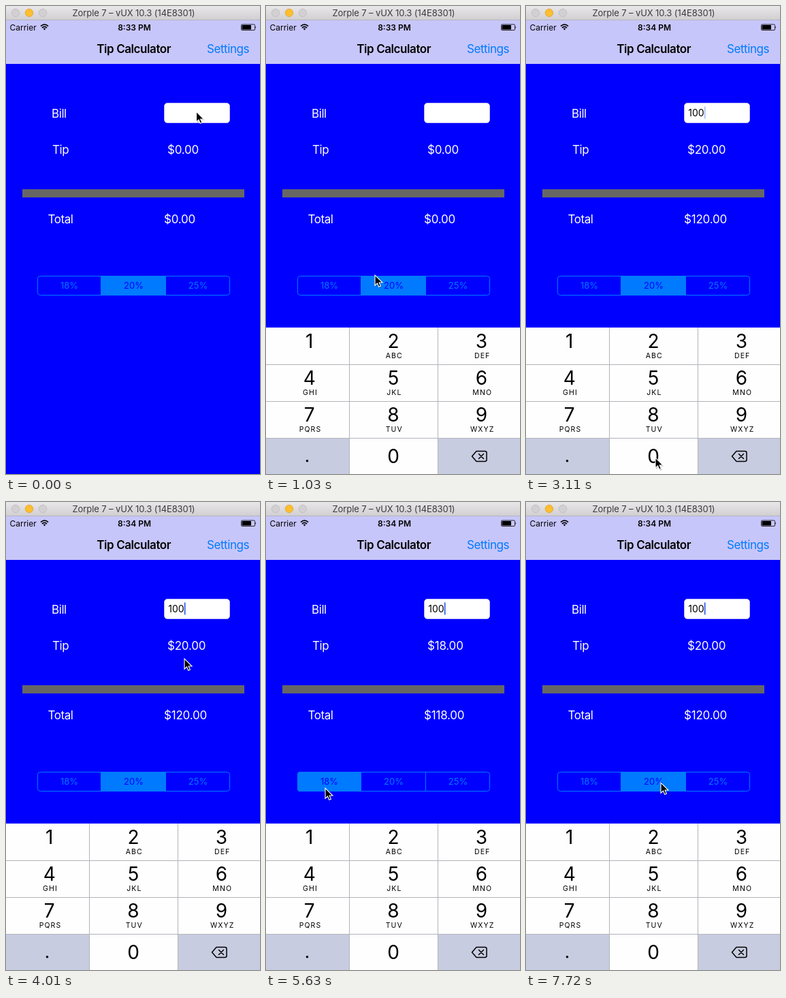
These frames come from a looping animation (373x687 px, 8000 ms). An HTML page:

```html
<!DOCTYPE html>
<html lang="en">
<head>
<meta charset="utf-8">
<title>Tip Calculator</title>
<style>
  html, body { margin: 0; width: 100%; height: 100%; overflow: hidden; background: #00f; }
  svg { display: block; width: 100vw; height: 100vh; cursor: default; }
  text { font-family: Inter, sans-serif; font-size: 17px; letter-spacing: -.43px; white-space: pre; }
  .mid { text-anchor: middle; }
  .label { fill: #fff; }
  .value { fill: #fff; letter-spacing: -.2px; }
  .bold { font-weight: 600; }
  .status { font-size: 12px; letter-spacing: 0; }
  .window { font-size: 13px; letter-spacing: -.1px; fill: #3c3b3c; }
  .entry { font-size: 14px; letter-spacing: 0; }
  .seg { font-size: 13px; letter-spacing: 0; }
  .digit { font-size: 28px; letter-spacing: 0; }
  .letters { font-size: 10.5px; letter-spacing: 1.1px; }
</style>
</head>
<body>
<svg viewBox="0 0 373 687" preserveAspectRatio="none">
  <defs>
    <linearGradient id="chrome" x2="0" y2="1">
      <stop stop-color="#e9e7e9"/><stop offset="1" stop-color="#d1cfd1"/>
    </linearGradient>
    <clipPath id="segClip"><rect x="46" y="396" width="283" height="29" rx="4"/></clipPath>
  </defs>

  <rect width="373" height="687" fill="#00f"/>
  <rect y="20" width="373" height="65" fill="#c7c6fa"/>
  <rect width="373" height="20" fill="url(#chrome)"/>
  <rect y="20" width="373" height="1" fill="#b5b3c0"/>
  <g fill="#d2d0d2" stroke="#bdbbbd" stroke-width=".8">
    <circle cx="14" cy="10" r="5.7"/>
    <circle cx="34" cy="10" r="5.7" fill="#fdbe2f" stroke="#e0a32b"/>
    <circle cx="54" cy="10" r="5.7"/>
  </g>
  <text class="window mid" x="187.5" y="15">Zorple 7 – vUX 10.3 (14E8301)</text>

  <text class="status" x="5.5" y="36">Carrier</text>
  <g fill="none" stroke="#000" stroke-width="1.7">
    <path d="M51 29.6Q56.5 24.6 62 29.6M53 32Q56.5 28.8 60 32"/>
    <path d="M54.6 33.3Q56.5 31.8 58.4 33.3L56.5 35.4Z" fill="#000" stroke="none"/>
  </g>
  <text id="clock" class="status bold mid" x="188.5" y="36"></text>
  <rect x="345.5" y="27" width="20" height="8.5" rx="1.5" fill="none" stroke="#000" stroke-width=".8"/>
  <rect x="346.5" y="28" width="13.5" height="6.5" rx=".5"/>
  <path d="M366.5 29.5q1.6 1.7 0 3.4z"/>

  <text class="bold mid" x="187.7" y="69">Tip Calculator</text>
  <text x="295" y="69" fill="#007aff">Settings</text>

  <text class="label" x="67" y="163.5">Bill</text>
  <text class="label" x="68" y="217">Tip</text>
  <text class="label" x="61.5" y="318.5">Total</text>
  <text id="tip" class="value" x="237" y="217"></text>
  <text id="total" class="value" x="232" y="318.5"></text>
  <rect x="24" y="269" width="326" height="12" fill="#666"/>

  <rect x="232.5" y="142.5" width="96" height="29" rx="4.5" fill="#fff" stroke="#dcdcf4" stroke-width=".6"/>
  <text id="bill" class="entry" x="238.3" y="162"></text>
  <rect id="caret" y="147.5" width="2" height="18" fill="#426bf2"/>

  <g id="segments">
    <rect id="selected" y="396" height="29" fill="#007aff" clip-path="url(#segClip)"/>
    <rect x="46.5" y="396.5" width="282" height="28" rx="4" fill="none" stroke="#007aff"/>
    <path d="M139.5 396v29M234.5 396v29" stroke="#007aff"/>
  </g>

  <g id="keyboard">
    <rect width="373" height="216" fill="#fefefe"/>
    <path d="M0 162h122v54H0zM253 162h120v54H253z" fill="#c8cce0"/>
    <rect id="pressed" height="54" fill="#c8cce0"/>
    <path d="M122.5 0v216M252.5 0v216M0 54.5h373M0 108.5h373M0 162.5h373" stroke="#b3b4ba" fill="none"/>
    <g id="keys"></g>
    <circle cx="60.5" cy="195.8" r="1.8"/>
    <g fill="none" stroke="#000" stroke-width="1.5" stroke-linejoin="round" stroke-linecap="round">
      <path d="M309 181.5h12.5q2.5 0 2.5 2.5v10q0 2.500-2.500 2.500H309L302.500 189Z"/>
      <path d="M312.500 185.500l7 7m0-7l-7 7"/>
    </g>
  </g>

  <g id="pointer">
    <path d="M1 1.500V17l3.600-3.300 2.300 5.300 2.900-1.200-2.300-5.200h5Z" fill="#000" opacity=".25"/>
    <path d="M0 0V15.200L3.500 12l2.300 5.300 2.600-1.100-2.300-5.200H11Z" fill="#000" stroke="#fff" stroke-width="1.1"/>
  </g>
</svg>

<script>
const $ = id => document.getElementById(id);
const LOOP = 8000, STEP = 148.3, SLACK = 16;

// Each row: first step, then the state held from there on.
const pointerSteps = [
  [0, 279.5, 155], [6, 238, 250], [7, 160, 395], [8, 92, 476], [9, 72, 496],
  [12, 130, 590], [13, 185, 650.5], [14, 190, 663],
  [23, 205, 600], [24, 228, 450], [25, 240, 330],
  [27, 262, 230], [28, 292, 140], [29, 316, 96], [30, 300, 150],
  [31, 252, 280], [32, 195, 385], [33, 171, 405.5], [34, 126, 411],
  [35, 97, 417], [36, 87, 420],
  [40, 98, 418], [41, 145, 411], [42, 215, 404], [43, 266, 400], [44, 276, 399.5],
  [48, 244, 406], [49, 198, 412]
];
const billSteps = [[0, ""], [11, "1"], [15, "10"], [17, "100"]];
const rateSteps = [[0, 1], [37, 0], [45, 2], [51, 1]];
const pressSteps = [[0, ""], [11, "1"], [12, ""], [17, "0"], [18, ""]];
const focusStep = 1, clockStep = 17, slideStart = 275;

const rates = [18, 20, 25];
const segEdges = [46, 139, 235, 329];
const segCenters = [93, 187.5, 282];
const keyCenters = [64, 187.3, 316.7];

const at = (table, step) => table.findLast(row => row[0] <= step);
const money = n => "$" + n.toFixed(2);

function addText(parent, cls, x, y, content) {
  const el = document.createElementNS("http://www.w3.org/2000/svg", "text");
  el.setAttribute("class", cls);
  el.setAttribute("x", x);
  el.setAttribute("y", y);
  el.textContent = content;
  parent.append(el);
  return el;
}

function setAttrs(el, attrs) {
  for (const name in attrs) el.setAttribute(name, attrs[name]);
}

const segLabels = rates.map((rate, i) =>
  addText($("segments"), "seg mid", segCenters[i], 415, rate + "%"));

["", "ABC", "DEF", "GHI", "JKL", "MNO", "PQRS", "TUV", "WXYZ"].forEach((letters, i) => {
  const x = keyCenters[i % 3], y = 54 * Math.floor(i / 3);
  addText($("keys"), "digit mid", x - .3, y + 30, i + 1);
  addText($("keys"), "letters mid", x + 1, y + 45, letters);
});
addText($("keys"), "digit mid", 187, 199, "0");

// Critically damped spring from 0 to 1.
function spring(ms) {
  const x = Math.max(0, ms) * .01826;
  return 1 - Math.exp(-x) * (1 + x);
}

function caretOpacity(step, resetStep) {
  const phase = (((step - resetStep) * STEP + 420) % 1000) / 1000;
  if (phase < .08) return .4;
  if (phase < .38) return 0;
  return phase < .5 ? .4 : 1;
}

function render(time) {
  const step = Math.floor((time + SLACK) / STEP);
  const [, x, y] = at(pointerSteps, step);
  const [typedStep, bill] = at(billSteps, step);
  const rate = at(rateSteps, step)[1];
  const key = at(pressSteps, step)[1];
  const tip = bill * rates[rate] / 100;

  $("clock").textContent = step < clockStep ? "8:33 PM" : "8:34 PM";
  $("bill").textContent = bill;
  $("tip").textContent = money(tip);
  $("total").textContent = money(+bill + tip);

  const end = bill ? $("bill").getComputedTextLength() : .7;
  setAttrs($("caret"), {
    x: 238.3 + end,
    opacity: step < focusStep ? 0 : caretOpacity(step, typedStep || focusStep)
  });

  setAttrs($("selected"), { x: segEdges[rate], width: segEdges[rate + 1] - segEdges[rate] });
  segLabels.forEach((el, i) => el.setAttribute("fill", i === rate ? "#00f" : "#007aff"));

  setAttrs($("pressed"), key === "0" ? { x: 123, y: 162, width: 129 } : { x: 0, y: 0, width: key ? 122 : 0 });
  const top = 687 - 215 * spring(step * STEP - slideStart);
  setAttrs($("keyboard"), { transform: `translate(0 ${Math.round(top)})` });
  setAttrs($("pointer"), { transform: `translate(${x} ${y})` });
}

const start = performance.now();
function tick() {
  render((performance.now() - start) % LOOP);
  requestAnimationFrame(tick);
}
tick();
</script>
</body>
</html>
```
